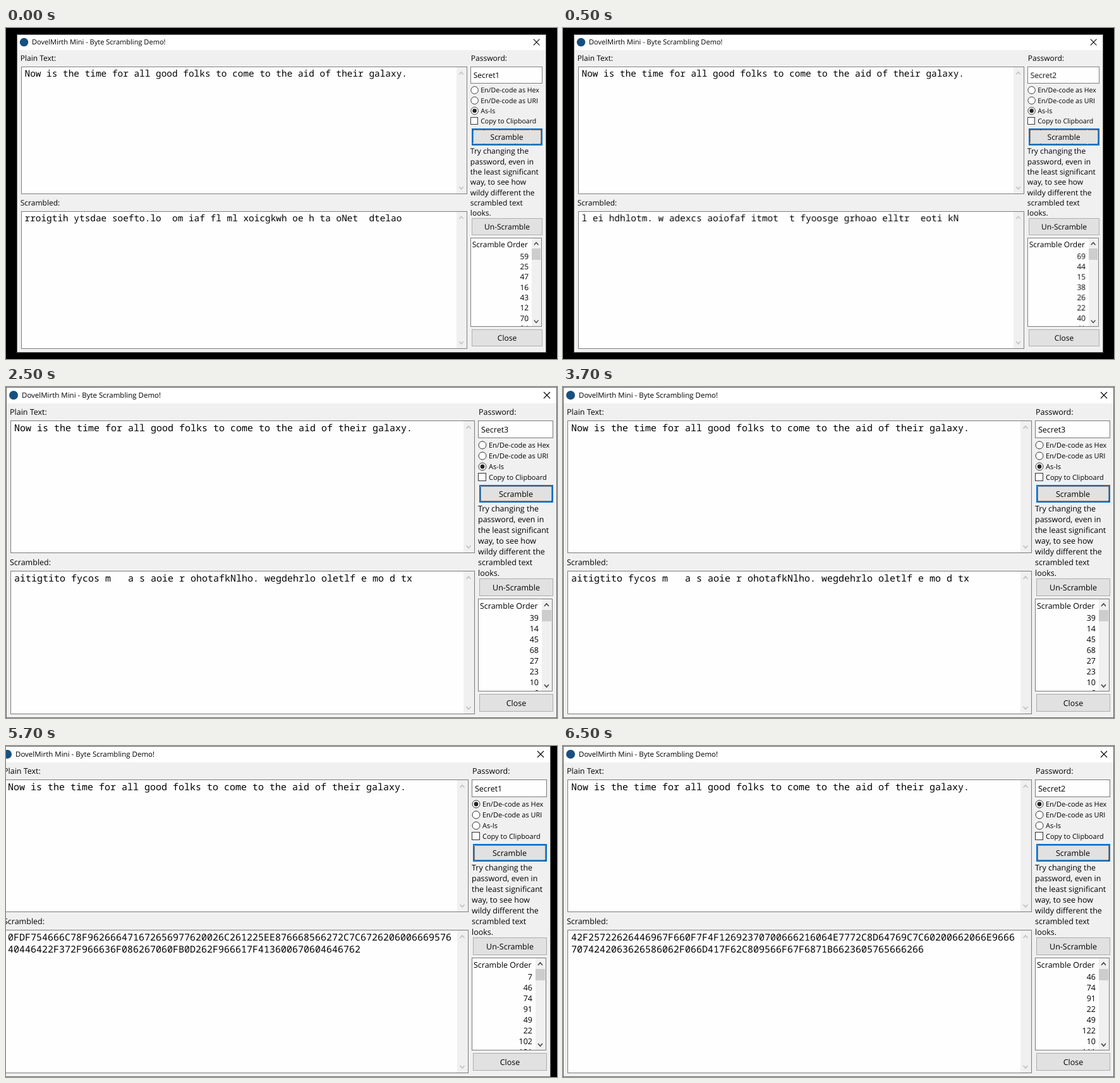
Animation, 872 px wide and 524 px high, one loop 8000 ms. Source, as an HTML page:

```html
<!DOCTYPE html>
<html lang="en">
<head>
<meta charset="utf-8">
<title>Byte Scrambling Demo</title>
<style>
  html, body { margin: 0; width: 100%; height: 100%; overflow: hidden; background: #000; }
  svg { display: block; width: 872px; height: 524px; }
  text { font: 12.5px "Open Sans", "Noto Sans", sans-serif; fill: #000; white-space: pre; text-rendering: geometricPrecision; }
  .title { font-size: 11.5px; }
  .small { font-size: 11px; }
  .mono { font: 15px "Noto Sans Mono", monospace; }
  .mid { text-anchor: middle; }
  .end { text-anchor: end; }
  rect { shape-rendering: crispEdges; }
  .box { fill: #fefefe; stroke: #7a7a7a; }
  .btn { fill: #e1e1e1; stroke: #adadad; }
  .focus { fill: #e1e1e1; stroke: #0b70c8; stroke-width: 2; }
  .dots { fill: none; stroke: #222; stroke-dasharray: 1 1; }
  .track { fill: #f0f0f0; }
  .thumb { fill: #cdcdcd; }
  .tick { fill: #fefefe; stroke: #333; }
  .arrow { fill: none; stroke: #bfbfbf; stroke-width: 1.5; }
  .dark { stroke: #404040; }

  .state { opacity: 0; }
  .play .win, .play .state { animation: 8s step-end infinite; }
  .play .win { animation-name: place; }
  .play .state:nth-child(1) { animation-name: show1; }
  .play .state:nth-child(2) { animation-name: show2; }
  .play .state:nth-child(3) { animation-name: show3; }
  .play .state:nth-child(4) { animation-name: show4; }
  .play .state:nth-child(5) { animation-name: show5; }

  @keyframes place {
    0% { transform: translate(17px, 10px) scale(.961); }
    31.25% { transform: translate(0px, 0px) scale(1); }
    56.25% { transform: translate(-10px, 0px) scale(1); }
    81.25%, 100% { transform: translate(0px, 0px) scale(1); }
  }
  @keyframes show1 { 0% { opacity: 1; } 6.25%, 100% { opacity: 0; } }
  @keyframes show2 { 0% { opacity: 0; } 6.25% { opacity: 1; } 31.25%, 100% { opacity: 0; } }
  @keyframes show3 { 0% { opacity: 0; } 31.25% { opacity: 1; } 56.25%, 100% { opacity: 0; } }
  @keyframes show4 { 0% { opacity: 0; } 56.25% { opacity: 1; } 81.25%, 100% { opacity: 0; } }
  @keyframes show5 { 0% { opacity: 0; } 81.25%, 100% { opacity: 1; } }
</style>
</head>
<body>
<svg viewBox="0 0 872 524">
  <clipPath id="list"><rect x="748" y="336" width="100" height="145"/></clipPath>
  <g class="win">
    <g id="frame"></g>
    <g id="states"></g>
  </g>
</svg>
<script>
  const text = (x, y, s, cls = "") => `<text x="${x}" y="${y}" class="${cls}">${s}</text>`;
  const rect = (x, y, w, h, cls) => `<rect x="${x}" y="${y}" width="${w}" height="${h}" class="${cls}"/>`;
  const arrow = (x, y, dir, cls = "") =>
    `<path class="arrow ${cls}" d="M${x - 3.5} ${y + 2 * dir}l3.5 ${-4 * dir}l3.5 ${4 * dir}"/>`;
  const button = (y, label) => rect(749.5, y + .5, 116, 27, "btn") + text(807.5, y + 19, label, "mid");
  const radio = (y, label) => `<circle cx="754" cy="${y}" r="6" class="tick"/>` + text(764, y + 4, label, "small");
  const textArea = (y, h) =>
    rect(7.5, y + .5, 734, h - 1, "box") +
    rect(724, y + 1, 17, h - 2, "track") +
    arrow(732, y + 11, 1) + arrow(732, y + h - 10, -1);

  const hint = ["Try changing the", "password, even in", "the least significant", "way, to see how",
    "wildy different the", "scrambled text", "looks."];

  document.getElementById("frame").innerHTML = [
    `<rect width="872" height="524" fill="#666"/>`,
    `<rect x="1" y="1" width="870" height="522" fill="#f0f0f0"/>`,
    `<rect x="1" y="1" width="870" height="25" fill="#fff"/>`,
    `<circle cx="12" cy="13" r="7" fill="#17507f"/>`,
    text(25, 17, "DovelMirth Mini - Byte Scrambling Demo!", "title"),
    `<path d="M851 8l10 10m0-10l-10 10" stroke="#000" stroke-width="1.1"/>`,
    text(6, 44, "Plain Text:"),
    textArea(53, 210),
    text(13, 70, "Now is the time for all good folks to come to the aid of their galaxy.", "mono"),
    text(6, 282, "Scrambled:"),
    textArea(291, 227),
    text(748, 44, "Password:"),
    rect(747.5, 53.5, 118, 27, "box"),
    radio(92, "En/De-code as Hex"),
    radio(109, "En/De-code as URI"),
    radio(126, "As-Is"),
    rect(747.5, 136.5, 12, 12, "tick"),
    text(764, 147, "Copy to Clipboard", "small"),
    rect(750, 156, 115, 26, "focus"),
    rect(751.5, 157.5, 112, 23, "dots"),
    text(807, 174, "Scramble", "mid"),
    ...hint.map((line, i) => text(747, 197 + 17 * i, line)),
    button(303, "Un-Scramble"),
    rect(747.5, 335.5, 117, 146, "box"),
    rect(848, 336, 16, 145, "track"),
    rect(848, 353, 15, 18, "thumb"),
    arrow(855.5, 345, 1, "dark"), arrow(855.5, 473, -1, "dark"),
    text(750, 351, "Scramble Order"),
    button(486, "Close")
  ].join("");

  const asIs = 126, hex = 92;
  const states = [
    { key: "Secret1", mode: asIs, order: [59, 25, 47, 16, 43, 12, 70, 24],
      out: ["rroigtih ytsdae soefto.lo  om iaf fl ml xoicgkwh oe h ta oNet  dtelao"] },
    { key: "Secret2", mode: asIs, order: [69, 44, 15, 38, 26, 22, 40, 41],
      out: ["l ei hdhlotm. w adexcs aoiofaf itmot  t fyoosge grhoao elltr  eoti kN"] },
    { key: "Secret3", mode: asIs, order: [39, 14, 45, 68, 27, 23, 10, 6],
      out: ["aitigtito fycos m   a s aoie r ohotafkNlho. wegdehrlo oletlf e mo d tx"] },
    { key: "Secret1", mode: hex, order: [7, 46, 74, 91, 49, 22, 102, 121],
      out: ["0FDF754666C78F962666471672656977620026C261225EE876668566272C7C6726206006669576",
            "40446422F372F966636F086267060FB0D262F966617F413600670604646762"] },
    { key: "Secret2", mode: hex, order: [46, 74, 91, 22, 49, 122, 10, 111],
      out: ["42F25722626446967F660F7F4F12692370700666216064E7772C8D64769C7C60200662066E9666",
            "7074242063626586062F066D417F62C809566F67F6871B6623605765666266"] }
  ];

  document.getElementById("states").innerHTML = states.map(s => `<g class="state">
    ${text(752, 72, s.key)}
    <circle cx="754" cy="${s.mode}" r="3.4" fill="#222"/>
    ${s.out.map((line, i) => text(13, 308 + 19 * i, line, "mono")).join("")}
    <g clip-path="url(#list)">${s.order.map((n, i) => text(843, 370 + 17 * i, n, "end")).join("")}</g>
  </g>`).join("");

  // Start every animation together, once all parts exist.
  document.querySelector("svg").classList.add("play");
</script>
</body>
</html>
```
